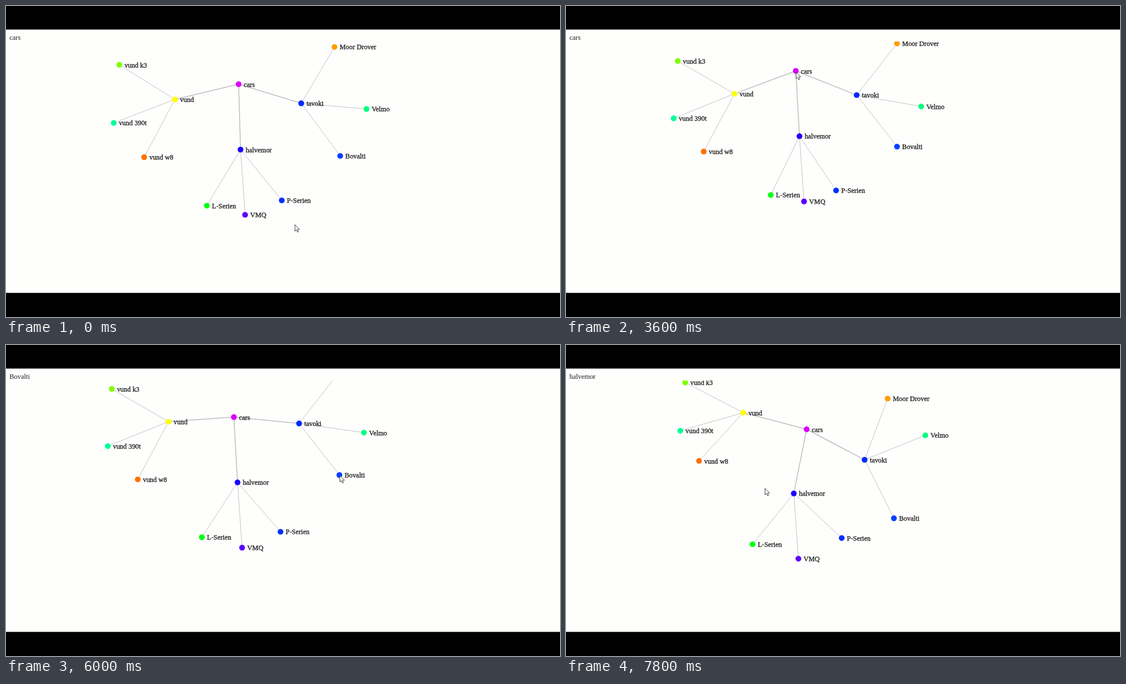
An HTML page that plays this animation: 998x561 px, repeating every 8 s.

```html
<!DOCTYPE html>
<html lang="en">
<head>
<meta charset="utf-8">
<title>Tree graph</title>
<style>
  html, body { margin: 0; width: 100%; height: 100%; overflow: hidden; background: #000; }
  svg { display: block; width: 100%; height: 100%; }
  text { font: 12.45px "Liberation Serif", "Times New Roman", serif; fill: #1c1c1c; }
  .label { stroke: #1c1c1c; stroke-width: .3px; }
  .link { stroke: #bbb; }
</style>
</head>
<body>
<svg id="stage" viewBox="0 0 998 561">
  <clipPath id="view"><rect y="64" width="998" height="453"/></clipPath>
  <rect width="998" height="561" fill="#000"/>
  <rect y="42.5" width="998" height="475" fill="#fefefd"/>
  <text id="title" x="6.3" y="60.6"></text>
  <g clip-path="url(#view)">
    <g id="links"></g>
    <g id="nodes"></g>
  </g>
  <path id="cursor" d="M.5 .5V12.2L3.2 9.7L5 14L6.9 13.2L5.1 9H8.8Z" fill="#fff" stroke="#333" stroke-width=".9"/>
</svg>
<script>
const LOOP = 8000, STEP = 200, LINK = 118;

// Tracks hold one value per key time: grab root, drop it, grab leaf, drop it, end.
const KEYS = [2600, 3600, 6000, 7000, 7800];

const root = {
  label: 'cars', color: '#dc00fa',
  x: [419, 414, 410.5, 430.5, 433.5],
  y: [141, 117, 130, 143, 152]
};

// dir: angle seen from the root; face, spread, mid: the fan of three leaves (degrees)
const hubs = [
  {
    label: 'vund', color: '#ffff00',
    dir: [166.5, 159.5, 176, 187, 194.7], face: [165, 164, 164, 168, 170],
    spread: [47, 46, 46, 39, 37.5], mid: -6,
    leaves: [['vund k3', '#80ff00'], ['vund 390t', '#00ff99'], ['vund w8', '#ff7000']]
  },
  {
    label: 'tavoki', color: '#0028ff',
    dir: [17, 21.7, 5.6, 27.8, 27.8], face: [-3, 0, 0, 0, -3],
    spread: [56.5, 52, 52, 70.4, 66.4], mid: [8, 10, 8, -22, -19],
    leaves: [['Bovalti', '#0040ff', [1, 1, 1, 1.12, 1]], ['Velmo', '#00ff80'], ['Moor Drover', '#ff9c00']]
  },
  {
    label: 'halvemor', color: '#1c00ff',
    dir: [88.3, 86.8, 86.8, 98, 101.3], face: 86,
    spread: [35, 30, 37, 41, 43], mid: 0,
    leaves: [['L-Serien', '#00ff15'], ['VMQ', '#5c00ff'], ['P-Serien', '#0030ff']]
  }
];

// time, x, y of the pointer tip
const pointer = [
  [0, 520, 394], [1200, 496, 336], [2600, 419, 143.5], [3600, 414, 119], [4200, 534, 113],
  [5200, 594, 224], [6000, 601, 235], [7000, 578, 327], [7800, 358, 258]
];

const $ = id => document.getElementById(id);
const mix = (a, b, k) => a + (b - a) * k;
const smooth = k => k * k * (3 - 2 * k);
const relax = k => (1 - Math.exp(-1.6 * k)) / (1 - Math.exp(-1.6));

function set(el, attrs) {
  for (const key in attrs) el.setAttribute(key, attrs[key]);
}

function add(parent, tag, attrs) {
  const el = document.createElementNS('http://www.w3.org/2000/svg', tag);
  set(el, attrs);
  parent.append(el);
  return el;
}

// Segment index and progress within a rising list of times
function locate(times, t) {
  const next = times.findIndex(time => time > t);
  const i = next < 0 ? times.length - 2 : Math.max(0, next - 1);
  const k = (t - times[i]) / (times[i + 1] - times[i]);
  return [i, Math.min(1, Math.max(0, k))];
}

// Drags ease in and out; after each one the graph relaxes.
function sampler(t) {
  const [i, k] = locate(KEYS, t);
  const eased = i % 2 ? relax(k) : smooth(k);
  return v => Array.isArray(v) ? mix(v[i], v[i + 1], eased) : v;
}

function build(node, width) {
  if (width) node.link = add($('links'), 'line', { class: 'link', 'stroke-width': width });
  node.group = add($('nodes'), 'g', {});
  add(node.group, 'circle', { r: 5.2, fill: node.color });
  add(node.group, 'text', { class: 'label', x: 9.3, y: 4.6 }).textContent = node.label;
}

build(root);
for (const hub of hubs) {
  build(hub, 1.45);
  hub.leaves = hub.leaves.map(([label, color, stretch = 1]) => ({ label, color, stretch }));
  hub.leaves.forEach(leaf => build(leaf, 0.9));
}

function place(node, x, y, from) {
  node.at = { x, y };
  set(node.group, { transform: `translate(${x} ${y})` });
  if (from) set(node.link, { x1: from.x, y1: from.y, x2: x, y2: y });
}

function hang(node, from, degrees, length) {
  const a = degrees * Math.PI / 180;
  place(node, from.x + length * Math.cos(a), from.y + length * Math.sin(a), from);
}

function titleAt(t) {
  if (t < 5400) return root.label;
  return t < 7600 ? hubs[1].leaves[0].label : hubs[2].label;
}

function draw(time) {
  const t = Math.floor((time % LOOP) / STEP) * STEP;
  const at = sampler(t);

  place(root, at(root.x), at(root.y));
  for (const hub of hubs) {
    hang(hub, root.at, at(hub.dir), LINK);
    const fan = [at(hub.spread), at(hub.mid), -at(hub.spread)];
    hub.leaves.forEach((leaf, i) =>
      hang(leaf, hub.at, at(hub.face) + fan[i], LINK * at(leaf.stretch)));
  }

  const [i, k] = locate(pointer.map(p => p[0]), t);
  const [x, y] = [1, 2].map(axis => mix(pointer[i][axis], pointer[i + 1][axis], k));
  set($('cursor'), { transform: `translate(${x} ${y})` });
  $('title').textContent = titleAt(t);
}

const start = performance.now();
function frame() {
  draw(performance.now() - start);
  requestAnimationFrame(frame);
}
frame();
</script>
</body>
</html>
```
